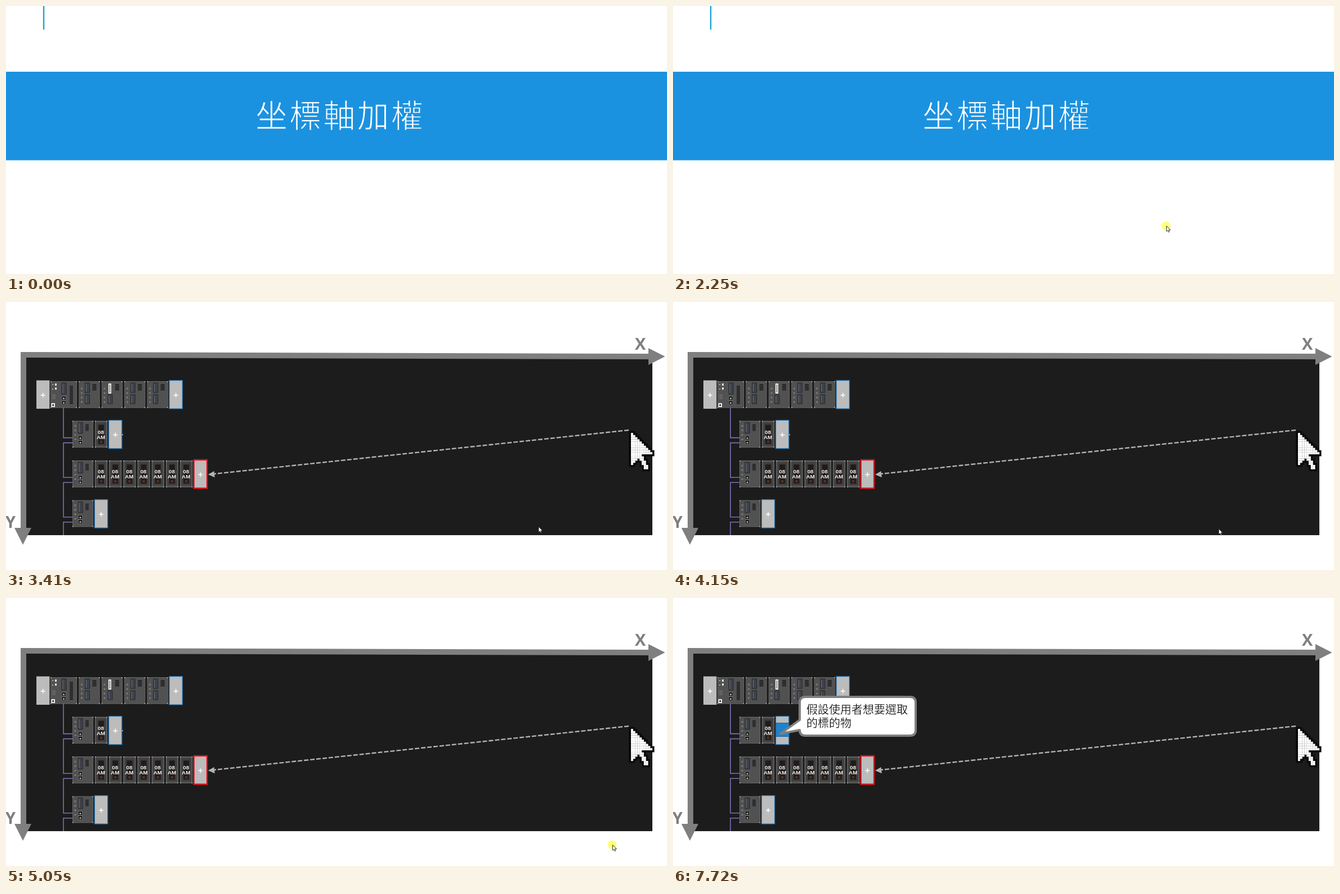
Animation, 1174 px wide and 477 px high, one loop 8 s. Source, as an HTML page:

```html
<!DOCTYPE html>
<html lang="zh-Hant">
<head>
<meta charset="utf-8">
<title>坐標軸加權</title>
<style>
  html, body { margin: 0; width: 100%; height: 100%; overflow: hidden; background: #fff; }
  svg { display: block; width: 100vw; height: 100vh; }
  .cjk { font-family: "Noto Sans CJK TC", "Noto Sans CJK", sans-serif; }
  /* The stroke in the background colour thins the strokes of the regular weight */
  .title { font-size: 57px; font-weight: 300; letter-spacing: 3.2px; fill: #fff; stroke: #1b92e0; stroke-width: 1.3px; }
  .note { font-size: 20px; fill: #000; stroke: #fff; stroke-width: .3px; }
  .axis { font: 700 29px "Open Sans", sans-serif; fill: #7f7f7f; }
  .label { font: 700 9.8px "Liberation Sans", Arial, sans-serif; fill: #f2f2f2; text-anchor: middle; }
</style>
</head>
<body>
<svg viewBox="0 0 1174 477" preserveAspectRatio="none">
  <g id="intro">
    <rect x="65.8" width="2.4" height="42" fill="#1ba3d6"/>
    <rect y="117" width="1174" height="157.6" fill="#1b92e0"/>
    <text class="cjk title" x="443" y="216">坐標軸加權</text>
  </g>
  <g id="diagram">
    <rect x="33" y="96" width="1115" height="319" fill="#1c1c1c"/>
    <path id="wire" fill="none" stroke="#7d70b4" stroke-width="1.6"/>
    <g id="rack"></g>
    <path d="M1106 228L369 306" stroke="#b2b2b2" stroke-width="2.4" stroke-dasharray="8 3"/>
    <path d="M359 307L369.5 301L370.8 312.3Z" fill="#b2b2b2"/>
    <g id="pointer"></g>
    <g fill="#7f7f7f">
      <path d="M26 89L1142 92V102L36 99V403H26Z"/>
      <path d="M1141 82L1170.5 97L1141 112Z"/>
      <path d="M15 402H45L30 432Z"/>
    </g>
    <text class="axis" x="1117" y="85">X</text>
    <text class="axis" x="-1" y="402">Y</text>
  </g>
  <g id="callout">
    <rect x="183" y="222.5" width="23" height="24" fill="#1f83cb" stroke="#17629a"/>
    <path d="M235 176H421Q431 176 431 186V235Q431 245 421 245H235Q225 245 225 235L191 241.5L225 217V186Q225 176 235 176Z"
          fill="#fff" stroke="#7f7f7f" stroke-width="4" stroke-linejoin="round"/>
    <text class="cjk note" x="237" y="206">假設使用者想要選取</text>
    <text class="cjk note" x="237" y="230">的標的物</text>
  </g>
  <g id="cursor">
    <circle id="glow" cx="-.3" cy=".3" r="8" fill="#ffff78"/>
    <path d="M.5 .5V10.2L2.7 8.2L4.2 11.6L5.8 10.9L4.3 7.6H7.5Z" fill="#fff" stroke="#222" stroke-width=".9"/>
  </g>
</svg>
<script>
const $ = id => document.getElementById(id);
const loop = (n, make) => Array.from({ length: n }, (_, i) => make(i)).join('');
const box = (x, y, w, h, fill, extra = '') =>
  `<rect x="${x}" y="${y}" width="${w}" height="${h}" fill="${fill}" ${extra}/>`;

// Parts of a module
const body = (x, y, w) =>
  box(x + .4, y + .4, w - .8, 46.7, '#515151', 'stroke="#707070" stroke-width=".8"') +
  loop(4, i => box(x + (i % 2) * (w - 1.5), y + (i >> 1) * 46, 1.5, 1.5, '#ccc'));
const knobs = (x, y) => loop(4, i =>
  `<circle cx="${x}" cy="${y + i * 8}" r="2.5" fill="#747474" stroke="#404040" stroke-width=".7"/>`);
const vent = (x, y, w, h) => box(x, y, w, h, '#242424') +
  loop(h / 3, i => box(x, y + 2 + i * 3, w, .8, '#4b4b4b'));
const screen = (x, y, h) =>
  box(x, y, 8, h, '#3d424c', 'stroke="#272727"') + box(x + 1.5, y + 1.5, 1, h - 3, '#69717e');
const ports = (x, y) => loop(2, i =>
  box(x, y + i * 8, 7, 6.5, '#111', 'stroke="#888" stroke-width=".6"') +
  box(x + 2, y + i * 8 + 2.5, 3, 2.5, '#b5b5b5'));

const tile = (x, y, edge = 'none', lw = 1.3) =>
  box(x, y, 23.4, 50.5, '#bcbcbc', `stroke="${edge}" stroke-width="${lw}"`) +
  `<path d="M${x + 7.7} ${y + 26.2}h8m-4 -4v8" stroke="#fff" stroke-width="1.5"/>`;

const cpu = (x, y) => body(x, y, 47) +
  loop(2, i => box(x + 3, y + 5 + i * 8, 2, 2, '#aaa') + box(x + 8, y + 4 + i * 7, 3, 4, '#ddd')) +
  box(x + 3, y + 23, 6, 9, '#626262') +
  box(x + 2.5, y + 40, 4.5, 5, '#222', 'stroke="#eee" stroke-width="2"') +
  screen(x + 20, y + 3, 20) + ports(x + 20, y + 27) + vent(x + 34, y + 8, 6, 33);

const slot = (x, y, bright) => body(x, y, 37) + knobs(x + 5, y + 13) +
  (bright ? box(x + 13, y + 5, 3, 16, '#444', 'stroke="#eee" stroke-width="2"') : screen(x + 11, y + 3, 17)) +
  screen(x + 11, y + 24, 16) + vent(x + 24, y + 5, 7, 12);

const head = (x, y) => body(x, y, 37) + knobs(x + 5, y + 9) +
  screen(x + 10, y + 3, 19) + vent(x + 23, y + 6, 6, 12) + ports(x + 10.5, y + 27);

const unit = (x, y) => body(x, y, 22) + box(x + 2.5, y + 3, 17, 41, '#3e3e3e') +
  box(x + 6, y + 7, 10, 34, '#211c1a') + box(x + 9, y + 35, 4, 4, '#5a3328') +
  ['08', 'AM'].map((s, i) => `<text class="label" x="${x + 10.5}" y="${y + 23 + i * 9}">${s}</text>`).join('');

const blue = '#226fae';
const rowY = i => 141 + i * 70.6;
const pitch = 25.2;

// One remote row: a head, some units and a tile
const row = (count, i) => {
  const y = rowY(i + 1);
  const edge = i === 1 ? ['#e01420', 2.4] : [blue];
  return head(118, y) + loop(count, n => unit(158 + n * pitch, y)) +
    tile(157.3 + count * pitch, y - 1.2, ...edge);
};
$('rack').innerHTML =
  tile(54, 139.5) + cpu(79, 141) + loop(4, i => slot(129.5 + i * 40.4, 141, i === 1)) +
  tile(290, 139.5, blue) + [1, 7, 0].map(row).join('') + box(206.5, 235.5, 1.5, 1.5, '#fff');
$('wire').setAttribute('d', 'M102 188' +
  loop(3, i => `V${rowY(i + 1) + 30}H130m0 9H102`) + 'V415');

// Enlarged pixel arrow: a head with diagonal edges and a slanted tail
const cell = 3.8;
const inArrow = (x, y) => {
  const tail = Math.floor((y - 3) / 2);
  return (x <= y && y < 10) || (y >= 10 && x + y <= 14) ||
    (y >= 10 && (x === tail || x === tail + 1));
};
const arrow = (fill, pad) => loop(17 * 10, i => {
  const x = i % 10, y = Math.floor(i / 10), size = cell + pad * 2 + .1;
  return inArrow(x, y) ? box(1110 + x * cell - pad, 233 + y * cell - pad, size, size, fill) : '';
});
$('pointer').innerHTML = arrow('#0a0a0a', 3.4) + arrow('#fff', 0);

// Cursor moves: each a quadratic curve walked in even steps
const moves = [
  { at: 460, step: 67, n: 7, from: [1096, 483], bend: [920, 400], to: [876, 391] },
  { at: 3060, step: 70, n: 5, from: [876, 391], bend: [925, 399], to: [945.5, 399.5] },
  { at: 4070, step: 71, n: 12, from: [946, 400], bend: [1015, 408], to: [1077, 439] },
];
const clicks = [2250, 3340, 5050];
const LOOP = 8000;

function tip(t) {
  const m = moves.filter(m => m.at <= t).pop() || moves[0];
  const k = Math.min(m.n, Math.max(1, Math.floor((t - m.at) / m.step) + 1));
  const p = k / m.n, q = 1 - p;
  return [0, 1].map(a => q * q * m.from[a] + 2 * p * q * m.bend[a] + p * p * m.to[a]);
}

const show = (id, on) => { $(id).style.display = on ? '' : 'none'; };

function draw(t) {
  show('intro', t < 3410);
  show('diagram', t >= 3410);
  show('callout', t >= 5120);
  show('cursor', t >= 460 && t < 7720);
  show('glow', clicks.some(c => t >= c && t < c + 70));
  $('cursor').setAttribute('transform', `translate(${tip(t).join(' ')})`);
}

const start = performance.now();
function tick() {
  draw((performance.now() - start) % LOOP);
  requestAnimationFrame(tick);
}
tick();
</script>
</body>
</html>
```
